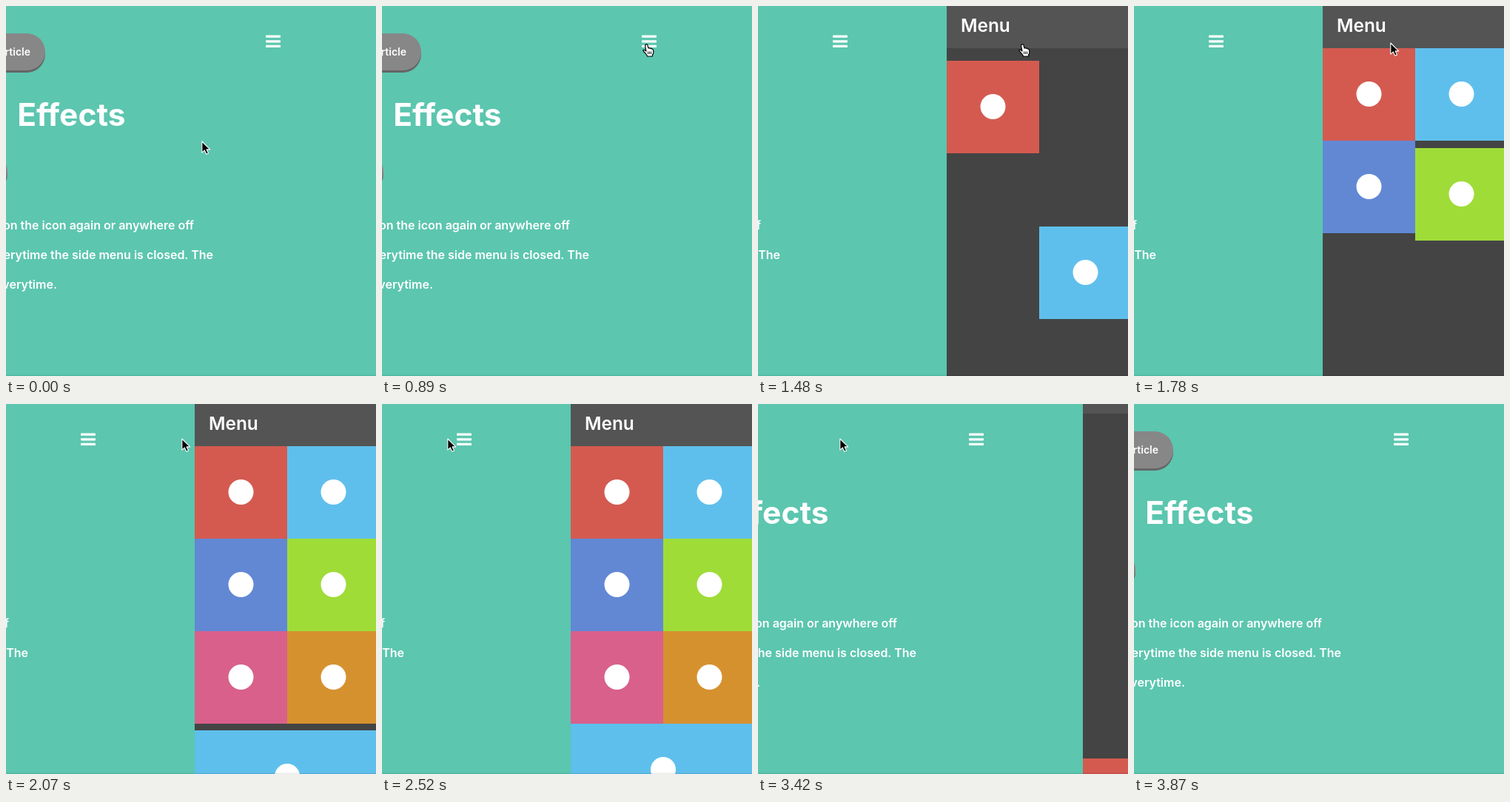
Write an HTML page that moves like this. It is 500x500 px and loops after 4740 ms.

```html
<!DOCTYPE html>
<html lang="en">
<head>
<meta charset="utf-8">
<title>Side menu effect</title>
<style>
  html, body { margin: 0; width: 100%; height: 100%; overflow: hidden; background: #444; }
  svg { display: block; width: 100vw; height: 100vh; }
  text { font-family: Inter, "Open Sans", sans-serif; font-weight: 600; fill: #fff; }
  .end { text-anchor: end; }
  .title { font-size: 42.5px; font-weight: 700; }
  .body { font-size: 16px; }
  .label { font-size: 14px; }
  .menu { font-size: 24.4px; }
</style>
</head>
<body>
<svg viewBox="0 0 500 500">
  <rect width="500" height="500" fill="#444"/>
  <g id="page">
    <rect x="-5" width="510" height="500" fill="#5cc6af"/>
    <g id="buttons">
      <rect x="-120" y="40" width="173" height="50" rx="25" fill="#666"/>
      <rect x="-120" y="37" width="173" height="50" rx="25" fill="#878787"/>
      <rect x="-120" y="202" width="122" height="50" rx="25" fill="#666"/>
      <rect x="-120" y="199" width="122" height="50" rx="25" fill="#878787"/>
    </g>
    <text class="end label" x="33" y="67">Article</text>
    <text class="end title" x="161.5" y="162">Effects</text>
    <text class="end body" x="254" y="302">on the icon again or anywhere off</text>
    <text class="end body" x="280" y="342">everytime the side menu is closed. The</text>
    <text class="end body" x="69" y="382">everytime.</text>
    <g fill="#fff">
      <rect x="351" y="39.6" width="20" height="3.2" rx=".8"/>
      <rect x="351" y="46.2" width="20" height="3.2" rx=".8"/>
      <rect x="351" y="52.8" width="20" height="3.2" rx=".8"/>
    </g>
  </g>
  <g id="panel">
    <rect width="250" height="500" fill="#444"/>
    <g id="tiles"></g>
    <g id="header">
      <rect width="250" height="57" fill="#545454"/>
      <text class="menu" x="19" y="35">Menu</text>
    </g>
  </g>
  <rect y="498.5" width="500" height="1.5" fill="#000" opacity=".08"/>
  <g id="cursor" stroke-linejoin="round">
    <path id="arrow" d="M.8 1V16.2L4.3 12.9L6.8 18.3L9.5 17.1L7.1 11.9H11.7Z" fill="#000" stroke="#fff" stroke-width="1.1"/>
    <g id="hand" stroke="#000">
      <path d="M5 .9Q6.6 .5 7 2.2L8 6Q9.6 5 10.2 6.3Q11.8 5.6 12.3 7Q14 6.6 14.4 8.4L14.9 11Q15 13 13.6 14.8L13.4 17H6.6Q6 15 4.6 13.6L1.3 10Q.5 8.8 1.5 8.3Q2.8 8 4 9.3L5 10L3.6 3Q3.4 1.4 5 .9Z" fill="#fff" stroke-width="1.2"/>
      <path d="M7.6 10.5V14M9.6 10.5V14M11.6 10.5V14" fill="none" stroke-width=".9"/>
    </g>
  </g>
</svg>
<script>
const LOOP = 4740;
const SHIFT = 250, EDGE = 505;
const HEADER_RISE = 60, TILE_DROP = 573;
const OPEN = { start: 1250, length: 216 };
const TILE = { start: 1311, length: 216, gap: 96.5 };
const CLOSE = { start: 3255, length: 375 };

// time, cursor shape, left, top
const STEPS = [
  [0, 'arrow', 264, 182], [450, 'arrow', 315, 124], [590, 'arrow', 350, 67],
  [740, 'hand', 350, 58], [890, 'hand', 352, 51], [1330, 'hand', 352, 51],
  [1480, 'hand', 352, 51], [1630, 'hand', 352, 51], [1780, 'arrow', 346, 49],
  [1930, 'arrow', 300, 48], [2070, 'arrow', 237, 46], [2220, 'arrow', 170, 46],
  [2370, 'arrow', 147, 46], [2520, 'arrow', 88, 46], [2820, 'hand', 101, 48],
  [2970, 'hand', 105, 48], [3420, 'arrow', 110, 46], [3570, 'arrow', 130, 230],
  [3720, 'arrow', 160, 424], [3870, '', 0, 0]
];
const COLORS = ['#d45a50', '#5fbfec', '#6288d4', '#9fdc38', '#d9608b', '#d6912f', '#5fbfec'];

const $ = id => document.getElementById(id);
const move = (el, x, y) => el.setAttribute('transform', `translate(${x} ${y})`);

function add(parent, tag, attrs) {
  const el = document.createElementNS('http://www.w3.org/2000/svg', tag);
  for (const key in attrs) el.setAttribute(key, attrs[key]);
  return parent.appendChild(el);
}

const tiles = COLORS.map((fill, i) => {
  const el = add($('tiles'), 'g', {});
  const width = i === 6 ? 250 : 125;
  const x = i % 2 * 125, y = 57 + Math.floor(i / 2) * 125;
  add(el, 'rect', { x, y, width, height: 125, fill });
  add(el, 'circle', { cx: x + width / 2, cy: y + 62, r: 17, fill: '#fff' });
  return el;
});

// cubic-bezier(.25, .1, .25, 1), solved by bisection
function ease(p) {
  if (p <= 0) return 0;
  if (p >= 1) return 1;
  let lo = 0, hi = 1, s;
  for (let i = 0; i < 24; i++) {
    s = (lo + hi) / 2;
    if (.75 * s * (1 - s) + s ** 3 < p) lo = s; else hi = s;
  }
  return .3 * s * (1 - s) ** 2 + 3 * s * s * (1 - s) + s ** 3;
}

const progress = (t, { start, length }, delay = 0) => ease((t - start - delay) / length);

function draw(now) {
  const time = now % LOOP;
  const [t, shape, x, y] = STEPS.findLast(step => step[0] <= time);
  const closed = progress(t, CLOSE);
  const open = progress(t, OPEN) - closed;
  const shift = Math.round(SHIFT * open);

  move($('page'), -shift, 0);
  move($('panel'), EDGE - shift, 0);
  move($('header'), 0, Math.round(-HEADER_RISE * (1 - open)));
  tiles.forEach((el, i) => {
    const shown = progress(t, TILE, i * TILE.gap) - closed;
    move(el, 0, Math.round(TILE_DROP * (1 - shown)));
  });

  move($('cursor'), x, y);
  for (const id of ['arrow', 'hand']) $(id).style.display = id === shape ? '' : 'none';
}

const begin = performance.now();
function tick() {
  draw(performance.now() - begin);
  requestAnimationFrame(tick);
}
tick();
</script>
</body>
</html>
```
